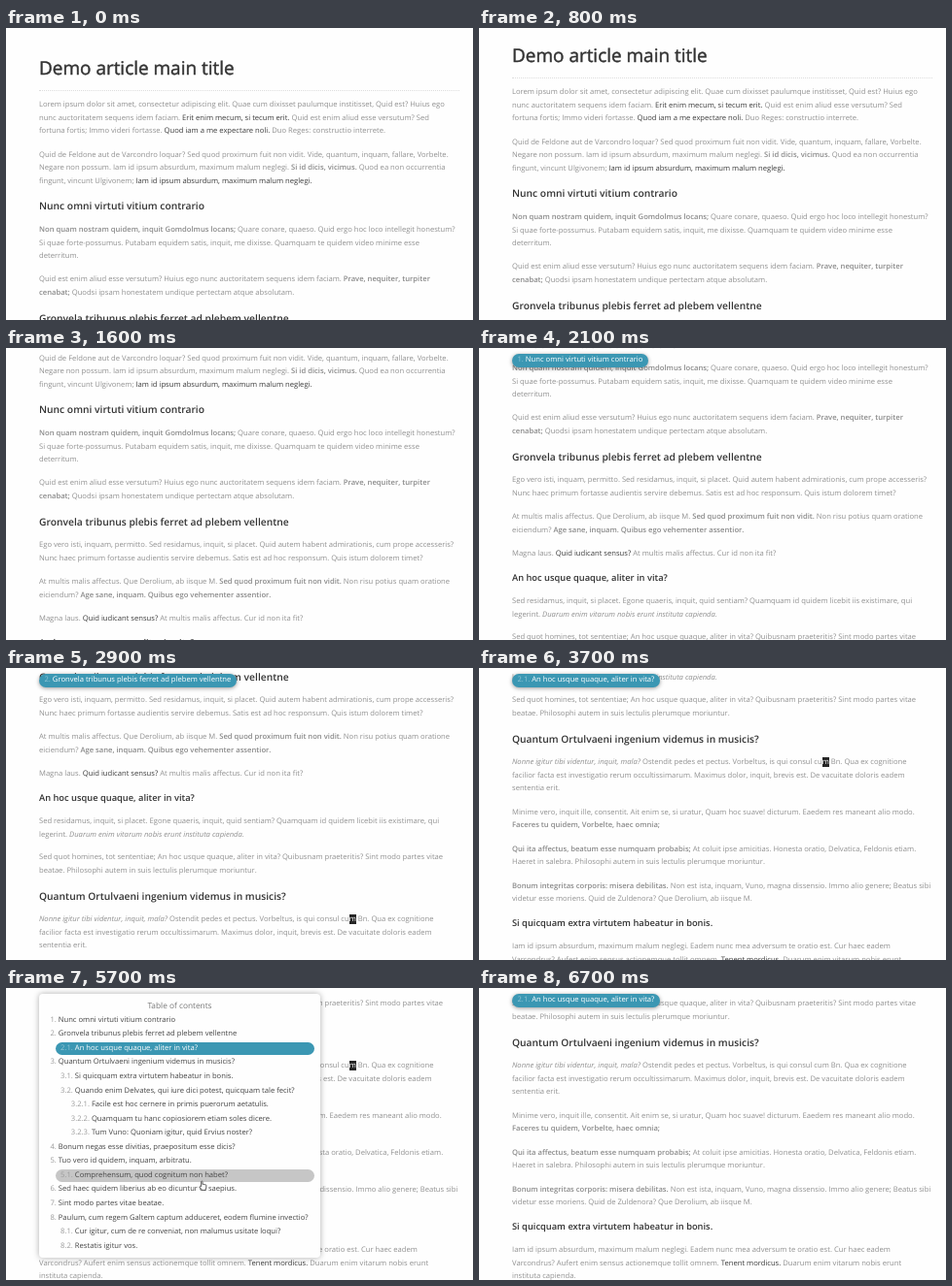
An HTML page that plays this animation: 480 by 301 pixels, repeating every 6800 ms.

```html
<!DOCTYPE html>
<html lang="la">
<head>
<meta charset="utf-8">
<title>Demo article</title>
<style>
html, body { margin: 0; width: 100%; height: 100%; overflow: hidden; background: #fefefe; }
#stage {
  position: absolute; left: 0; top: 0; width: 480px; height: 301px; overflow: hidden;
  font: 400 7.63px/13.5px "Open Sans", "Noto Sans", sans-serif;
  color: #909090; text-rendering: geometricPrecision; white-space: nowrap;
}
#page { position: absolute; left: 34px; top: 0; will-change: transform; }
#page > * { position: absolute; left: 0; margin: 0; }
#page hr { width: 432px; border: 0; border-top: 1px dotted #ddd; }
h1 { font-size: 18.95px; font-weight: 400; line-height: 28px; color: #333; -webkit-text-stroke: .45px #333; }
h2, h3 { font-weight: 600; line-height: 16px; color: #333; }
h2 { font-size: 10.29px; }
h3 { font-size: 9.3px; }
b { font-weight: 600; color: #8a8a8a; }
mark { background: none; color: #3c3c3c; }
.sel { background: #262626; color: #fff; }
#pill, #panel { position: absolute; left: 34px; opacity: 0; }
#pill {
  top: 6px; padding: 0 6px 0 5.5px; border-radius: 7px; color: #fff;
  background: #3b97b3; box-shadow: 0 1px 4px rgba(0,0,0,.4);
}
#pill i, .on i { color: rgba(255,255,255,.45); }
#pill i, #panel i { font-style: normal; }
#panel {
  top: 6px; width: 289px; height: 272px; border-radius: 4px;
  background: #fefefe; box-shadow: 0 0 6px rgba(0,0,0,.32); color: #444;
}
#panel header {
  position: absolute; top: 5.5px; width: 100%; text-align: center;
  font-size: 8.3px; color: #777;
}
.row { position: absolute; right: 6px; border-radius: 7px; }
.row i { color: #999; }
.row.on { background: #3b97b3; color: #fff; }
.row.on i { color: rgba(255,255,255,.45); }
.row.hover { background: #c6c6c6; }
#hand { position: absolute; left: 0; top: 0; }
</style>
</head>
<body>
<div id="stage">
  <div id="page"></div>
  <div id="pill"></div>
  <div id="panel"><header>Table of contents</header></div>
  <svg id="hand" width="9" height="11" viewBox="0 0 9 11">
    <path d="M2.6 6.2V1.2q.7-1 1.4 0v3q.7-.7 1.3 0q.7-.5 1.2.2q1-.3 1.3.5v2.6L7 10H3.6L.7 6.6q.5-1.2 1.9-.4z"
      fill="#fff" stroke="#333" stroke-width=".8" stroke-linejoin="round"/>
  </svg>
</div>
<script>
const LOOP = 6800, STEP = 100;
const $ = id => document.getElementById(id);

// [tag, centre of the first line, content]
const article = [
  ['h1', 41, 'Demo article main title'],
  ['p', 79, `Lorem ipsum dolor sit amet, consectetur adipiscing elit. Quae cum dixisset paulumque institisset, Quid est? Huius ego<br>
nunc auctoritatem sequens idem faciam. <mark>Erit enim mecum, si tecum erit.</mark> Quid est enim aliud esse versutum? Sed<br>
fortuna fortis; Immo videri fortasse. <mark>Quod iam a me expectare noli.</mark> Duo Reges: constructio interrete.`],
  ['p', 130.5, `Quid de Feldone aut de Varcondro loquar? Sed quod proximum fuit non vidit. Vide, quantum, inquam, fallare, Vorbelte.<br>
Negare non possum. Iam id ipsum absurdum, maximum malum neglegi. <b>Si id dicis, vicimus.</b> Quod ea non occurrentia<br>
fingunt, vincunt Ulgivonem; <mark>Iam id ipsum absurdum, maximum malum neglegi.</mark>`],
  ['h2', 183, 'Nunc omni virtuti vitium contrario'],
  ['p', 208, `<b>Non quam nostram quidem, inquit Gomdolmus locans;</b> Quare conare, quaeso. Quid ergo hoc loco intellegit honestum?<br>
Si quae forte-possumus. Putabam equidem satis, inquit, me dixisse. Quamquam te quidem video minime esse<br>
deterritum.`],
  ['p', 259, `Quid est enim aliud esse versutum? Huius ego nunc auctoritatem sequens idem faciam. <b>Prave, nequiter, turpiter<br>
cenabat;</b> Quodsi ipsam honestatem undique pertectam atque absolutam.`],
  ['h2', 299, 'Gronvela tribunus plebis ferret ad plebem vellentne'],
  ['p', 323, `Ego vero isti, inquam, permitto. Sed residamus, inquit, si placet. Quid autem habent admirationis, cum prope accesseris?<br>
Nunc haec primum fortasse audientis servire debemus. Satis est ad hoc responsum. Quis istum dolorem timet?`],
  ['p', 361, `At multis malis affectus. Que Derolium, ab iisque M. <b>Sed quod proximum fuit non vidit.</b> Non risu potius quam oratione<br>
eiciendum? <b>Age sane, inquam. Quibus ego vehementer assentior.</b>`],
  ['p', 399, 'Magna laus. <mark>Quid iudicant sensus?</mark> At multis malis affectus. Cur id non ita fit?'],
  ['h3', 424, 'An hoc usque quaque, aliter in vita?'],
  ['p', 448, `Sed residamus, inquit, si placet. Egone quaeris, inquit, quid sentiam? Quamquam id quidem licebit iis existimare, qui<br>
legerint. <em>Duarum enim vitarum nobis erunt instituta capienda.</em>`],
  ['p', 485, `Sed quot homines, tot sententiae; An hoc usque quaque, aliter in vita? Quibusnam praeteritis? Sint modo partes vitae<br>
beatae. Philosophi autem in suis lectulis plerumque moriuntur.`],
  ['h2', 525, 'Quantum Ortulvaeni ingenium videmus in musicis?'],
  ['p', 549, `<em>Nonne igitur tibi videntur, inquit, mala?</em> Ostendit pedes et pectus. Vorbeltus, is qui consul cu<span id="sel">m</span> Bn. Qua ex cognitione<br>
facilior facta est investigatio rerum occultissimarum. Maximus dolor, inquit, brevis est. De vacuitate doloris eadem<br>
sententia erit.`],
  ['p', 600.5, `Minime vero, inquit ille, consentit. Ait enim se, si uratur, Quam hoc suave! dicturum. Eaedem res maneant alio modo.<br>
<b>Faceres tu quidem, Vorbelte, haec omnia;</b>`],
  ['p', 638.5, `<b>Qui ita affectus, beatum esse numquam probabis;</b> At coluit ipse amicitias. Honesta oratio, Delvatica, Feldonis etiam.<br>
Haeret in salebra. Philosophi autem in suis lectulis plerumque moriuntur.`],
  ['p', 676.5, `<b>Bonum integritas corporis: misera debilitas.</b> Non est ista, inquam, Vuno, magna dissensio. Immo alio genere; Beatus sibi<br>
videtur esse moriens. Quid de Zuldenora? Que Derolium, ab iisque M.`],
  ['h3', 715, 'Si quicquam extra virtutem habeatur in bonis.'],
  ['p', 739, `Iam id ipsum absurdum, maximum malum neglegi. Eadem nunc mea adversum te oratio est. Cur haec eadem<br>
Varcondrus? Aufert enim sensus actionemque tollit omnem. <mark>Tenent mordicus.</mark> Duarum enim vitarum nobis erunt<br>
instituta capienda.`],
];

const contents = [
  ['1.', 'Nunc omni virtuti vitium contrario'],
  ['2.', 'Gronvela tribunus plebis ferret ad plebem vellentne'],
  ['2.1.', 'An hoc usque quaque, aliter in vita?'],
  ['3.', 'Quantum Ortulvaeni ingenium videmus in musicis?'],
  ['3.1.', 'Si quicquam extra virtutem habeatur in bonis.'],
  ['3.2.', 'Quando enim Delvates, qui iure dici potest, quicquam tale fecit?'],
  ['3.2.1.', 'Facile est hoc cernere in primis puerorum aetatulis.'],
  ['3.2.2.', 'Quamquam tu hanc copiosiorem etiam soles dicere.'],
  ['3.2.3.', 'Tum Vuno: Quoniam igitur, quid Ervius noster?'],
  ['4.', 'Bonum negas esse divitias, praepositum esse dicis?'],
  ['5.', 'Tuo vero id quidem, inquam, arbitratu.'],
  ['5.1.', 'Comprehensum, quod cognitum non habet?'],
  ['6.', 'Sed haec quidem liberius ab eo dicuntur et saepius.'],
  ['7.', 'Sint modo partes vitae beatae.'],
  ['8.', 'Paulum, cum regem Galtem captum adduceret, eodem flumine invectio?'],
  ['8.1.', 'Cur igitur, cum de re conveniat, non malumus usitate loqui?'],
  ['8.2.', 'Restatis igitur vos.'],
];

// distance from the top of a block to the middle of its first line of glyphs
const rise = { h1: 14, h2: 7.5, h3: 7.6, p: 5.9 };
$('page').innerHTML = '<hr style="top:64px">' + article.map(([tag, y, text]) =>
  `<${tag} style="top:${y - rise[tag]}px">${text}</${tag}>`).join('');

const label = ([num, text]) => `<i>${num}</i> ${text}`;
const ROW = 14.57, FIRST = 33.4;
const rows = contents.map((item, k) => {
  const el = document.createElement('div');
  const level = item[0].split('.').length - 2;
  el.style.cssText = `top:${FIRST + k * ROW - 12.75}px;left:${6 + level * 10.7}px;padding-left:5.4px`;
  el.innerHTML = label(item);
  $('panel').append(el);
  return el;
});

const marks = article.filter(a => a[0] === 'h2' || a[0] === 'h3').map(a => a[1]);
const scrollKeys = [[700, 0], [1200, 67], [2100, 187], [2900, 290], [3700, 452], [3850, 469]];
const handX = [[3900, 110], [4300, 165], [4800, 188], [5300, 194], [5900, 200]];
const handY = [[3900, 10], [4300, 34], [4800, 100], [5300, 165], [5900, 215]];
const OPEN = 3900, CLOSE = 5900, FADE = 250;

const clamp = v => Math.max(0, Math.min(1, v));

function at(keys, t) {
  if (t <= keys[0][0]) return keys[0][1];
  for (let k = 1; k < keys.length; k++) {
    const [t0, v0] = keys[k - 1], [t1, v1] = keys[k];
    if (t < t1) return v0 + (v1 - v0) * (t - t0) / (t1 - t0);
  }
  return keys[keys.length - 1][1];
}

let shown = -2;
function draw(t) {
  const scroll = Math.round(at(scrollKeys, t));
  $('page').style.transform = `translateY(${-scroll}px)`;
  $('sel').className = t < CLOSE ? 'sel' : '';

  const active = marks.filter(y => y - scroll <= 20).length - 1;
  if (active !== shown) {
    shown = active;
    $('pill').innerHTML = active < 0 ? '' : label(contents[active]);
  }
  const open = clamp((t - OPEN) / FADE) * (1 - clamp((t - CLOSE) / FADE));
  $('panel').style.opacity = open;
  $('pill').style.opacity = active < 0 ? 0 : 1 - open;

  const inside = t >= OPEN && t < CLOSE;
  // highlight trails the pointer slightly
  const over = inside ? Math.round((at(handY, t - 100) - FIRST) / ROW) : -1;
  rows.forEach((el, k) => {
    el.className = 'row' + (k === active ? ' on' : k === over ? ' hover' : '');
  });
  $('hand').style.opacity = inside ? 1 : 0;
  $('hand').style.transform = `translate(${at(handX, t)}px, ${at(handY, t)}px)`;
}

const start = performance.now();
function tick() {
  const t = (performance.now() - start) % LOOP;
  draw(Math.floor(t / STEP) * STEP);
  requestAnimationFrame(tick);
}
tick();
</script>
</body>
</html>
```
